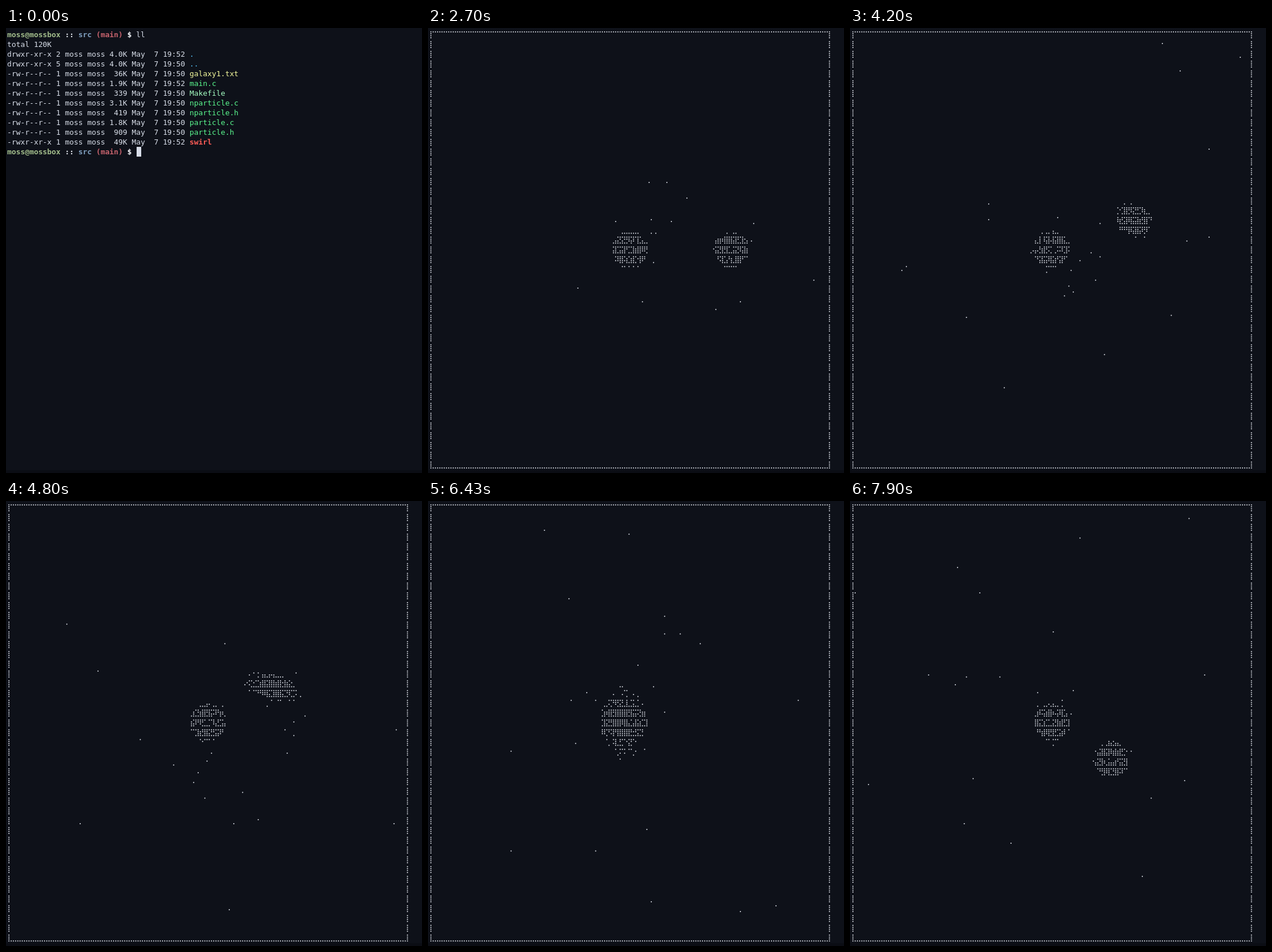
Write an HTML page that moves like this. It is 723x775 px and loops after 8000 ms.

```html
<!DOCTYPE html>
<html lang="en">
<head>
<meta charset="utf-8">
<title>Terminal galaxies</title>
<style>
html, body { margin: 0; width: 100%; height: 100%; overflow: hidden; background: #0e1119; }
svg { display: block; width: 723px; height: 775px; }
text { font: 12.85px "DejaVu Sans Mono", monospace; white-space: pre; fill: #d8dee9; }
.b { font-weight: bold; }
.dots { fill: none; stroke: #e2e6ee; stroke-width: 2; stroke-linecap: round; }
</style>
</head>
<body>
<svg viewBox="0 0 723 775">
  <rect width="723" height="775" fill="#0e1119"/>
  <rect y="770" width="723" height="5" fill="#0b0d14"/>
  <g id="shell"></g>
  <g id="sky">
    <path id="frame" class="dots"/>
    <path id="stars" class="dots"/>
  </g>
</svg>
<script>
const NS = "http://www.w3.org/2000/svg";
const LOOP = 8000, START = 2700;
const CHAR_W = 7.738, ROW_H = 17.03, BG = "#0e1119";
const byId = id => document.getElementById(id);

function add(parent, tag, attrs, content = "") {
  const el = document.createElementNS(NS, tag);
  for (const k in attrs) el.setAttribute(k, attrs[k]);
  el.textContent = content;
  parent.appendChild(el);
  return el;
}

// ---- Shell ----
const shell = byId("shell");
const PROMPT = [
  ["moss@mossbox", "#a3be8c"], [" :: ", "#e5e9f0"], ["src ", "#81a1c1"],
  ["(main)", "#c5626c"], [" $ ", "#f0f2f6"]
];
const GREEN = "#5af78e", BLUE = "#57c7ff";
const FILES = [
  ["drwxr-xr-x 2", "4.0K", "19:52", ".", BLUE],
  ["drwxr-xr-x 5", "4.0K", "19:50", "..", BLUE],
  ["-rw-r--r-- 1", " 36K", "19:50", "galaxy1.txt", "#f3f99d"],
  ["-rw-r--r-- 1", "1.9K", "19:52", "main.c", GREEN],
  ["-rw-r--r-- 1", " 339", "19:50", "Makefile", "#a5ffc3"],
  ["-rw-r--r-- 1", "3.1K", "19:50", "nparticle.c", GREEN],
  ["-rw-r--r-- 1", " 419", "19:50", "nparticle.h", GREEN],
  ["-rw-r--r-- 1", "1.8K", "19:50", "particle.c", GREEN],
  ["-rw-r--r-- 1", " 909", "19:50", "particle.h", GREEN],
  ["-rwxr-xr-x 1", " 49K", "19:52", "swirl", "#ff5c57"]
];

const line = row => add(shell, "text", { x: 2, y: 15.6 + row * ROW_H });

function prompt(row) {
  const el = line(row);
  for (const [str, fill] of PROMPT) add(el, "tspan", { class: "b", style: "fill:" + fill }, str);
  return el;
}

add(prompt(0), "tspan", {}, "ll");
add(line(1), "tspan", {}, "total 120K");
FILES.forEach(([mode, size, time, name, fill], i) => {
  const el = line(i + 2);
  add(el, "tspan", {}, `${mode} moss moss ${size} May  7 ${time} `);
  add(el, "tspan", { class: name === "swirl" ? "b" : "", style: "fill:" + fill }, name);
});

const cursor = add(shell, "rect", { y: 207, width: 8, height: 17, fill: "#d8dee9" });
const input = prompt(12);
const typed = add(input, "tspan", {});
const under = add(input, "tspan", { style: "fill:" + BG });
const hint = add(input, "tspan", { style: "fill:#616878" });
const COMMAND = "./swirl";
const TYPING = [[730, 1], [1230, 3], [1370, 4], [1700, 7]];

// The rest of the command is suggested in grey once the first key is typed
function drawShell(t) {
  let n = 0;
  for (const [at, count] of TYPING) if (t >= at) n = count;
  typed.textContent = COMMAND.slice(0, n);
  under.textContent = n ? COMMAND.slice(n, n + 1) : "";
  hint.textContent = n ? COMMAND.slice(n + 1) : "";
  cursor.setAttribute("x", Math.round(2.3 + (29 + n) * CHAR_W));
}

// ---- Braille dot grid: 90 x 45 cells of 2 x 4 dots ----
const COLS = 180, ROWS = 180, DOT_W = 3.869, DOT_H = 3.4, LEFT = 5.1, TOP = 6.7;
const clamp = (v, lo, hi) => Math.max(lo, Math.min(hi, v));
const dotX = c => LEFT + c * DOT_W;
const dotY = r => TOP + Math.floor(r / 4) * ROW_H + (r % 4) * DOT_H;
const dot = (c, r) => `M${dotX(c).toFixed(1)} ${dotY(r).toFixed(1)}h0`;

function snap(x, y) {
  const cell = Math.floor((y - 3) / ROW_H);
  const sub = clamp(Math.round((y - TOP - cell * ROW_H) / DOT_H), 0, 3);
  return [Math.round((x - LEFT) / DOT_W), cell * 4 + sub];
}

let border = "";
for (let c = 0; c < COLS; c++) border += dot(c, 0) + dot(c, ROWS - 1);
for (let r = 1; r < ROWS - 1; r++) border += dot(0, r) + dot(COLS - 1, r);
byId("frame").setAttribute("d", border);

// ---- Galaxies ----
let seed = 71;
function rand() {
  seed = (seed * 1664525 + 1013904223) % 4294967296;
  return seed / 4294967296;
}

const CX = 351, CY = 385.5, TAU = Math.PI * 2;
const many = (count, make) => Array.from({ length: count }, make);
const disc = (count, size) => many(count, () => {
  const r = Math.sqrt(25 + rand() * (size * size - 25));
  const g = rand() * 2 - 1;
  return { r, a: rand() * TAU, spin: 0.04 + 2.5 / r, lag: g * Math.abs(g) };
});
const core = disc(235, 31);
const guest = disc(270, 30);

// The guest falls along a Kepler ellipse focused on the core
const AXIS = 101, ECC = 0.75, PERIOD = 84, CLOSEST = 42;
function orbit(s) {
  const mean = TAU * (s - CLOSEST) / PERIOD;
  let e = Math.PI * Math.sign(mean);
  for (let i = 0; i < 8; i++) e -= (e - ECC * Math.sin(e) - mean) / (1 - ECC * Math.cos(e));
  return {
    x: CX - AXIS * (Math.cos(e) - ECC),
    y: CY + AXIS * Math.sqrt(1 - ECC * ECC) * Math.sin(e)
  };
}

// Tidal pull, strongest on the way in
const tide = s => Math.exp(-(((s - 31) / 11) ** 2));

// Stray stars, flung out again and again once the galaxies start to stir
const strays = many(30, (_, i) => ({
  a: rand() * TAU, period: 16 + rand() * 14, phase: rand(), fromGuest: i % 3 === 0
}));

function drawSky(s) {
  const lit = new Set();
  const plot = (x, y) => {
    const [c, r] = snap(x, y);
    if (c > 0 && c < COLS - 1 && r > 0 && r < ROWS - 1) lit.add(r * COLS + c);
  };
  const plotPolar = (center, dist, a) =>
    plot(center.x + dist * Math.cos(a), center.y + dist * Math.sin(a));
  const middle = { x: CX, y: CY };

  for (const p of core) plotPolar(middle, p.r, p.a - s * p.spin);

  const pull = tide(s);
  for (const p of guest) {
    plotPolar(orbit(s + p.lag * 8 * pull), p.r * (1 - 0.42 * pull), p.a - s * p.spin);
  }

  for (const p of strays) {
    const turn = s / p.period + p.phase, u = turn - Math.floor(turn);
    const birth = s - u * p.period;
    if (birth < -10) continue;
    const home = p.fromGuest ? orbit(birth) : middle;
    plotPolar(home, 35 + 410 * u ** 1.5, p.a + Math.floor(turn) * 2.4);
  }

  let d = "";
  for (const i of lit) d += dot(i % COLS, Math.floor(i / COLS));
  byId("stars").setAttribute("d", d);
}

// The simulation ticks faster at first, then settles at about ten per second
const stepAt = t => t < 4430 ? Math.floor((t - START) / 78.6) : 22 + Math.floor((t - 4430) / 99.1);

function draw(t) {
  const inShell = t < START;
  shell.style.display = inShell ? "" : "none";
  byId("sky").style.display = inShell ? "none" : "";
  if (inShell) drawShell(t);
  else drawSky(stepAt(t));
}

function tick() {
  draw(performance.now() % LOOP);
  requestAnimationFrame(tick);
}
tick();
</script>
</body>
</html>
```
